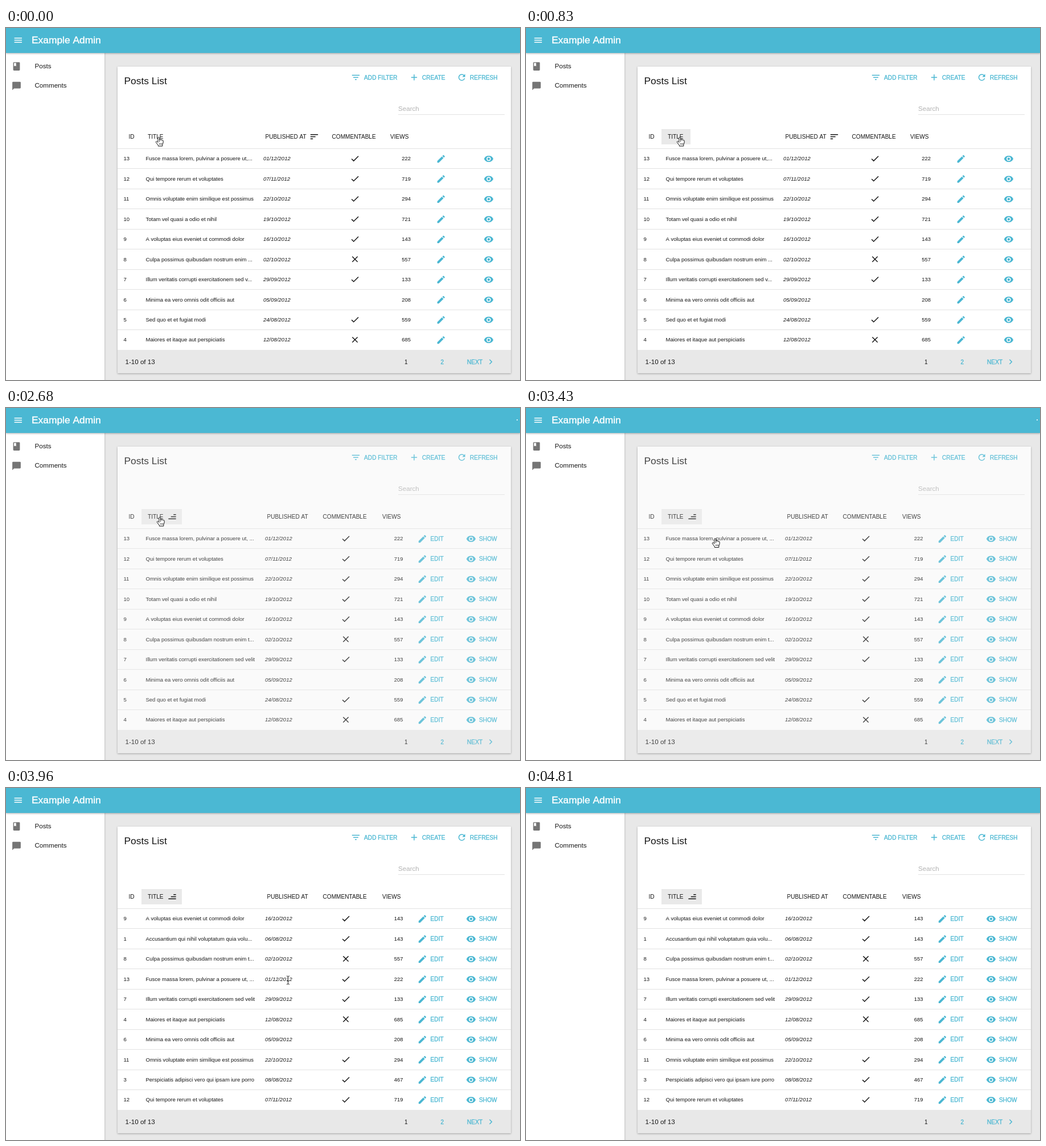
An HTML page with a canvas for the animation above (6.24 s loop, 903 px wide and 620 px high).

```html
<!DOCTYPE html>
<html lang="en">
<head>
<meta charset="utf-8">
<title>Posts List</title>
<style>
  html, body { margin: 0; width: 903px; height: 620px; overflow: hidden; }
  canvas { display: block; }
</style>
</head>
<body>
<canvas id="stage" width="903" height="620"></canvas>
<script>
const ctx = document.getElementById('stage').getContext('2d');
const LOOP = 6240, CLICK = 2450, FADE = 2500, LOADED = 3960;
const TEAL = '#4ab7d2', INK = '#161616', GREY = '#e8e8e8', LINE = '#e2e2e2';
const FIRST_ROW = 230, ROW = 35.45;

// Icons live on a 24 unit grid.
const icons = {
  menu: 'M3 6H21V8H3ZM3 11H21V13H3ZM3 16H21V18H3Z',
  book: 'M6 2H18A2 2 0 0 1 20 4V20A2 2 0 0 1 18 22H6A2 2 0 0 1 4 20V4A2 2 0 0 1 6 2ZM6 4H11V12L8.5 10.5 6 12Z',
  chat: 'M4 2H20A2 2 0 0 1 22 4V16A2 2 0 0 1 20 18H6L2 22V4A2 2 0 0 1 4 2Z',
  filter: 'M3 6H21V8H3ZM6 11H18V13H6ZM10 16H14V18H10Z',
  add: 'M11 5H13V11H19V13H13V19H11V13H5V11H11Z',
  refresh: 'M17.65 6.35A8 8 0 1 0 19.73 14H17.65A6 6 0 1 1 16.22 7.78L13 11H20V4Z',
  sortDown: 'M3 6H21V8H3ZM3 11H15V13H3ZM3 16H9V18H3Z',
  sortUp: 'M15 6H21V8H15ZM9 11H21V13H9ZM3 16H21V18H3Z',
  yes: 'M9 16.2L4.8 12 3.4 13.4 9 19 21 7 19.6 5.6Z',
  no: 'M5 6.4L6.4 5 12 10.6 17.6 5 19 6.4 13.4 12 19 17.6 17.6 19 12 13.4 6.4 19 5 17.6 10.6 12Z',
  edit: 'M3 17.25V21H6.75L17.8 9.95 14.05 6.2ZM20.7 7A1 1 0 0 0 20.7 5.6L18.4 3.3A1 1 0 0 0 17 3.3L15.1 5.1 18.9 8.9Z',
  eye: 'M1 12A11.85 11.85 0 0 1 23 12A11.85 11.85 0 0 1 1 12ZM7 12a5 5 0 0 0 10 0a5 5 0 0 0-10 0ZM9 12a3 3 0 0 0 6 0a3 3 0 0 0-6 0Z',
  next: 'M10 6L8.6 7.4 13.2 12 8.6 16.6 10 18 16 12Z'
};
for (const name in icons) icons[name] = new Path2D(icons[name]);

const hand = new Path2D('M-1.5 10L-3.3 8.2A1.2 1.2 0 0 0-4.9 9.8L-1 15V16.5H6.5V14L7.8 10.5V7.2A1 1 0 0 0 5.9 6.6A1 1 0 0 0 3.5 6A1.1 1.1 0 0 0 1.3 5.5V2A1.3 1.3 0 0 0-1.3 2Z');
const knuckles = new Path2D('M1.3 11.5V14M3.3 11.5V14M5.3 11.5V14M1.3 5.5V9');
const arrow = new Path2D('M0 0V12.4L2.9 9.7 5 14.5 7 13.6 5 9H9Z');
const beam = new Path2D('M-2.5 0Q0 0 0 2V13Q0 15-2.5 15M2.5 0Q0 0 0 2M0 13Q0 15 2.5 15M-1.5 9H1.5');

// id, title, date, commentable, views, shorter title for the narrow column
const posts = [
  [13, 'Fusce massa lorem, pulvinar a posuere ut, ...', '01/12/2012', 'yes', 222, 'Fusce massa lorem, pulvinar a posuere ut,...'],
  [12, 'Qui tempore rerum et voluptates', '07/11/2012', 'yes', 719],
  [11, 'Omnis voluptate enim similique est possimus', '22/10/2012', 'yes', 294],
  [10, 'Totam vel quasi a odio et nihil', '19/10/2012', 'yes', 721],
  [9, 'A voluptas eius eveniet ut commodi dolor', '16/10/2012', 'yes', 143],
  [8, 'Culpa possimus quibusdam nostrum enim t...', '02/10/2012', 'no', 557, 'Culpa possimus quibusdam nostrum enim ...'],
  [7, 'Illum veritatis corrupti exercitationem sed velit', '29/09/2012', 'yes', 133, 'Illum veritatis corrupti exercitationem sed v...'],
  [6, 'Minima ea vero omnis odit officiis aut', '05/09/2012', '', 208],
  [5, 'Sed quo et et fugiat modi', '24/08/2012', 'yes', 559],
  [4, 'Maiores et itaque aut perspiciatis', '12/08/2012', 'no', 685],
  [3, 'Perspiciatis adipisci vero qui ipsam iure porro', '08/08/2012', 'yes', 467],
  [1, 'Accusantium qui nihil voluptatum quia volu...', '06/08/2012', 'yes', 143]
];
const byDate = posts.slice(0, 10);
const byTitle = [...posts].sort((a, b) => a[1] < b[1] ? -1 : 1).slice(0, 10);

// start, time of last step, steps, end x, end y, pointer
const moves = [
  [0, 0, 1, 268.3, 191.5, 'hand'],
  [90, 90, 1, 269, 191.5, 'hand'],
  [230, 230, 1, 270.3, 190, 'hand'],
  [590, 830, 3, 270.3, 191.5, 'hand'],
  [3210, 3430, 5, 332.3, 229, 'hand'],
  [3490, 3780, 6, 421, 289, 'arrow'],
  [3870, 3870, 1, 489.5, 331.5, 'arrow'],
  [3960, 3960, 1, 495.5, 331, 'beam'],
  [4430, 4430, 1, 543, 377, 'arrow'],
  [4580, 4752, 4, 781, 586, 'arrow']
];
const POINTER_GONE = 4810;

function text(str, x, y, size = 9.5, color = INK, { align = 'left', style = '', heavy = 0 } = {}) {
  ctx.font = `${style} ${size}px "Liberation Sans", Arial, sans-serif`;
  ctx.textAlign = align;
  ctx.fillStyle = ctx.strokeStyle = color;
  ctx.lineWidth = heavy;
  ctx.fillText(str, x, y + size * 0.358);
  if (heavy) ctx.strokeText(str, x, y + size * 0.358);
}

function icon(name, x, y, color = TEAL) {
  ctx.save();
  ctx.translate(x, y);
  ctx.scale(0.7375, 0.7375);
  ctx.translate(-12, -12);
  ctx.fillStyle = color;
  ctx.fill(icons[name], 'evenodd');
  ctx.restore();
}

function box(x, y, w, h, color) {
  ctx.fillStyle = color;
  ctx.fillRect(x, y, w, h);
}

function raised(...args) {
  ctx.save();
  ctx.shadowColor = 'rgba(0,0,0,.3)';
  ctx.shadowBlur = 3;
  ctx.shadowOffsetY = 1;
  box(...args);
  ctx.restore();
}

const action = (str, x, y) => text(str, x, y, 10.2, TEAL, { heavy: 0.3 });

function drawFrame(t) {
  box(0, 0, 903, 620, GREY);
  raised(0, 0, 173, 630, '#fff');
  raised(0, 0, 903, 44, '#4bb8d3');
  icon('menu', 21.3, 21.5, '#fff');
  text('Example Admin', 45, 21, 17.4, '#fff', { heavy: 0.4 });
  if (t >= CLICK && t < LOADED) box(897, 20, 2, 2, '#d5eff5');
  icon('book', 18.5, 67.5, '#757575');
  text('Posts', 50.5, 67, 11.6);
  icon('chat', 18.5, 102, '#757575');
  text('Comments', 50.5, 101, 11.6);
}

function drawToolbar() {
  text('Posts List', 207.5, 93, 17.4);
  icon('filter', 614.5, 87);
  action('ADD FILTER', 629, 87);
  icon('add', 717, 87);
  action('CREATE', 731, 87);
  icon('refresh', 800.7, 87);
  action('REFRESH', 815, 87);
  text('Search', 689, 142, 11.6, '#b3b3b3');
  box(689, 152, 187, 1, LINE);
}

function drawHeadings(t, wide) {
  const y = 191.5, head = (str, x) => text(str, x, y, 10.1);
  if (t >= 90) box(238, 178, wide ? 71 : 51, 27, '#e9e9e9');
  head('ID', 215.5);
  head('TITLE', 249);
  head('PUBLISHED AT', wide ? 458.5 : 455.5);
  head('COMMENTABLE', wide ? 556.5 : 572.5);
  head('VIEWS', wide ? 661 : 675);
  if (wide) icon('sortUp', 292, y, INK);
  else icon('sortDown', 541.5, y, INK);
}

function drawRow([id, title, date, mark, views, shorter], i, wide) {
  const y = FIRST_ROW + i * ROW;
  box(196, Math.round(y - 18), 691, 1, LINE);
  text(id, 206.5, y);
  text(wide ? title : shorter || title, 245.5, y);
  text(date, wide ? 455 : 452, y, 9.55, INK, { style: 'italic' });
  if (mark) icon(mark, wide ? 597 : 613, y, INK);
  text(views, wide ? 697.5 : 711, y, 9.5, INK, { align: 'right' });
  icon('edit', wide ? 731.5 : 764.3, y + 0.5);
  icon('eye', wide ? 817 : 848, y + 0.5);
  if (wide) {
    action('EDIT', 745.5, y);
    action('SHOW', 831, y);
  }
}

function drawCard(t) {
  const wide = t >= CLICK;
  const loading = t >= FADE && t < LOADED;
  raised(196, 68, 691, 540, loading ? '#fafafa' : '#fff');
  ctx.globalAlpha = loading ? 0.8 : 1;
  drawToolbar();
  drawHeadings(t, wide);
  (t < LOADED ? byDate : byTitle).forEach((post, i) => drawRow(post, i, wide));
  box(196, 567, 691, 41, GREY);
  text('1-10 of 13', 209.5, 588, 11.6);
  text('1', 700, 588, 10.2);
  action('2', 763.5, 588);
  action('NEXT', 810, 588);
  icon('next', 851.5, 588);
  ctx.globalAlpha = 1;
}

function drawPointer(t) {
  if (t >= POINTER_GONE) return;
  let x = 268.3, y = 191.5, shape;
  for (const [start, last, steps, endX, endY, kind] of moves) {
    if (t < start) break;
    const gap = (last - start) / (steps - 1) || 1;
    const part = Math.min(1, (Math.floor((t - start) / gap + 1e-6) + 1) / steps);
    x += (endX - x) * part;
    y += (endY - y) * part;
    shape = kind;
  }
  ctx.save();
  ctx.translate(x, y);
  ctx.lineWidth = 1;
  if (shape === 'beam') {
    ctx.strokeStyle = '#222';
    ctx.stroke(beam);
  } else {
    const isHand = shape === 'hand';
    ctx.fillStyle = isHand ? '#fff' : '#000';
    ctx.strokeStyle = isHand ? '#111' : '#fff';
    ctx.fill(isHand ? hand : arrow);
    ctx.stroke(isHand ? hand : arrow);
    ctx.lineWidth = 0.8;
    if (isHand) ctx.stroke(knuckles);
  }
  ctx.restore();
}

const begin = performance.now();
function render() {
  const t = (performance.now() - begin) % LOOP;
  drawFrame(t);
  drawCard(t);
  drawPointer(t);
  requestAnimationFrame(render);
}
render();
</script>
</body>
</html>
```
